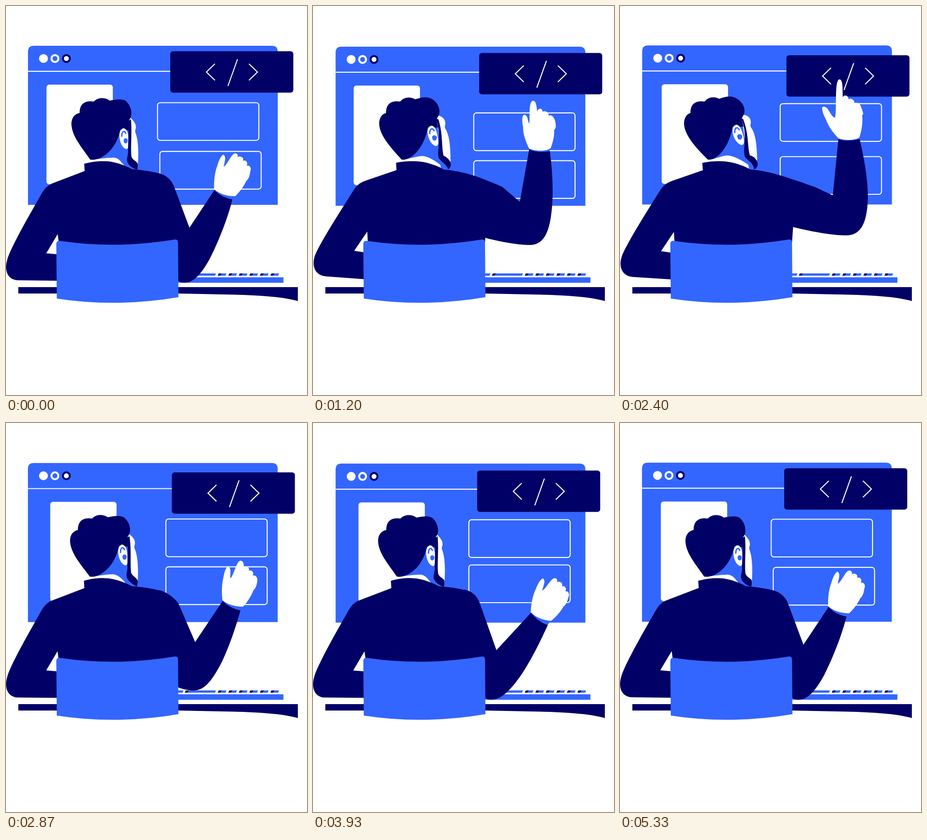
Write an HTML page that moves like this. It is 658 px wide and 851 px high and loops after 5.39 s.

```html
<!DOCTYPE html>
<html lang="en">
<head>
<meta charset="utf-8">
<title>Developer at a screen</title>
<style>
html, body { margin: 0; width: 100%; height: 100%; overflow: hidden; background: #fff; }
svg { display: block; width: 100vw; height: 100vh; }
.navy { fill: #000066; }
.blue { fill: #3366ff; }
.white { fill: #fff; }
.line { fill: none; stroke: #fff; stroke-width: 2.2; }
</style>
</head>
<body>
<svg viewBox="0 0 658 851">
  <g id="win">
    <path class="blue" d="M0,348V13Q0,0 13,0H533Q546,0 546,13V348Z"/>
    <path class="line" d="M0,56H546"/>
    <circle class="white" cx="34" cy="28" r="9.7"/>
    <circle class="white" cx="59" cy="28" r="9.7"/>
    <circle class="blue" cx="59" cy="28" r="5.4"/>
    <circle class="navy" cx="84" cy="28" r="9.7"/>
    <circle class="white" cx="84" cy="28" r="5.4"/>
    <rect id="card" class="white" y="85" width="145" height="218" rx="6"/>
    <rect id="box1" class="line" width="221.5" height="82.5" rx="6"/>
    <rect id="box2" class="line" width="221.5" height="82.5" rx="6"/>
  </g>
  <g id="badge">
    <rect class="navy" width="269" height="90.5" rx="6"/>
    <path class="line" d="M97.5,27.5L79,45.5L97.5,63.5M147,17.5L126,76M172,27.5L190.5,45.5L172,63.5"/>
  </g>
  <g id="keys">
    <rect class="blue" x="370" y="593.5" width="236.5" height="12"/>
    <path class="blue" d="M370,590V585H388L386,590ZM397,590L400,585H459L457,590Z"/>
    <path class="navy" d="M391,590L393,585H400L397,590Z"/>
  </g>
  <path class="navy" d="M27,615H638V645.5C610,637 560,633 500,631.5L377,629H27Z"/>
  <g id="back">
    <path id="neck" class="blue"/>
    <path id="collar" class="white"/>
  </g>
  <path id="torso" class="navy"/>
  <path id="arm" class="navy"/>
  <path id="cuff" class="blue"/>
  <path id="hand" class="white"/>
  <g id="head">
    <path id="face" class="white"/>
    <path id="beard" class="navy"/>
    <path id="hair" class="navy"/>
    <path id="ear" class="white"/>
    <path id="curl" fill="none" stroke="#3366ff" stroke-width="3"/>
    <path id="lobe" class="blue"/>
  </g>
  <path class="blue" d="M110,521Q110,512 119,514Q240,532 368,511Q376,509 376,518L377,637Q240,660 111,640Z"/>
</svg>
<script>
const LOOP = 5390, STEP = 200 / 3;
const $ = id => document.getElementById(id);

// Each part: rest pose first, then the poses it blends toward.
const parts = {
  torso: [
    'M171,345C190,340 203,339 217,339.5C240,340 262,350 276,357C300,359 320,362 338,367L356,400L377,480L377,530L117,530L113,499L88,541L111,543L130,545L130,601L110,601L25,600C5,599 -4,580 2,558C5,540 35,485 77,412C83,401 90,392 104,387L172,361Z',
    'M186,342C205,339 218,339 232,340C255,342 280,350 290,358C306,359 328,364 345,369L378,386L380,475L374,530L122,530L121,491L91,533L111,537L130,540L130,597L110,596L30,588C8,586 -3,570 4,545C8,530 50,465 92,402C100,390 106,385 120,380L187,358Z'
  ],
  arm: [
    'M250,400L335,366C353,371 362,382 367,394L401,485L456,402C464,412 478,420 495,423C484,468 462,520 446,552C428,585 410,605 393,605C386,606 380,604 377,602L300,500Z',
    'M250,400L345,369C360,373 400,386 430,396L470,409L479,282C492,288 512,285 526,281C538,325 548,370 549,405C550,450 543,494 503,494C475,494 430,487 380,475L300,460Z',
    'M250,400L332,364C350,369 359,380 364,394L401,500L482,418C491,431 506,443 518,446C497,488 478,522 458,550C432,585 412,605 390,605C384,606 380,604 377,602L300,500Z'
  ],
  cuff: [
    'M456,402C464,412 478,420 495,423L497,414Z',
    'M479,282C492,288 512,285 526,281L524,276Z',
    'M482,418C491,431 506,443 518,446L524,437Z'
  ],
  hand: [
    'M-1,-1C-2,-22 1,-40 6,-53C9,-64 14,-74 19,-77C27,-72 21,-60 20,-50C28,-56 34,-72 41,-78C47,-82 53,-77 50,-71C55,-75 65,-72 62,-63C68,-67 74,-59 70,-53C78,-54 81,-47 78,-40C77,-32 74,-22 69,-19C64,-7 52,8 45,14C29,15 10,9 -1,-1Z',
    'M0,-1C-9,-14 -19,-32 -19,-46C-24,-58 -25,-73 -20,-75C-10,-73 -11,-60 -6,-58C-5,-70 -13,-113 -2,-115C7,-115 5,-96 8,-86C9,-96 20,-95 19,-87C25,-91 35,-86 34,-79C42,-84 51,-72 52,-54C53,-50 51,-49 50,-48C53,-32 50,-18 48,-7C40,4 13,3 0,-1Z',
    'M0,-1C-10,-12 -22,-26 -27,-42C-33,-52 -38,-68 -34,-70C-20,-72 -20,-50 -7,-46C-3,-65 -9,-128 2,-130C12,-130 8,-100 10,-90C11,-98 23,-95 22,-86C28,-90 36,-84 35,-78C46,-82 50,-72 54,-56C55,-54 53,-53 52,-51C54,-34 50,-15 46,-3C36,4 13,4 0,-1Z'
  ],
  neck: [
    'M190,330L250,268L270,300L268,340L280,357L262,360L200,350Z',
    'M205,330L254,262L282,300L282,330L299,358L275,360L215,350Z'
  ],
  collar: [
    'M183,336C205,335 225,331 238,332C248,334 252,342 256,346C258,348 259,350 259,352L183,345Z',
    'M198,337C220,333 232,326 243,327C262,330 278,342 286,347C288,352 288,357 286,358L199,346Z'
  ],
  face: [
    'M272,244C276,249 284,255 284,265C284,270 281,272 283,277C290,295 290,325 288,350L274,340L268,250Z',
    'M276,238C283,239 292,243 292,254C292,258 290,260 292,265C303,280 305,305 306,338L284,325L272,245Z'
  ],
  beard: [
    'M266,252C270,275 266,305 267,320C266,330 263,335 265,341C269,350 278,356 287,358C288,352 289,346 287,343C282,337 276,337 274,328C272,305 276,275 273,248Z',
    'M271,246C281,270 279,290 278,305C277,315 277,322 279,330C287,340 298,344 299,357C304,356 307,352 307,345C305,334 297,328 290,327C284,305 288,280 275,247Z'
  ],
  hair: [
    'M184,336C165,308 144,285 143,258C143,245 150,236 161,234C161,216 170,206 192,209C200,200 216,199 227,207C243,204 252,203 261,207C273,217 276,232 273,243C271,248 268,250 267,254L268,272L250,270C244,300 228,322 205,333C197,336 190,337 184,336Z',
    'M198,336C178,316 147,285 146,258C146,245 151,237 160,234C160,216 169,206 191,209C198,199 212,197 223,203C240,197 251,196 262,203C275,211 279,223 278,232C277,240 272,243 272,248L276,264L252,264C248,295 230,322 217,330C210,335 204,337 198,336Z'
  ],
  ear: [
    'M248,283C248,272 254,266 259,268C266,271 268,282 267,295C267,305 268,313 263,313C254,311 248,297 248,283Z',
    'M252,273C252,264 257,259 262,260C270,263 273,275 276,286C278,296 278,304 271,304C262,302 253,288 252,273Z'
  ],
  curl: ['M253,286C253,273 260,271 262,280', 'M257,278C256,264 264,264 267,272'],
  lobe: [
    'M257,294C258,288 264,288 266,293C266,301 262,302 258,299Z',
    'M262,285C263,279 270,279 273,284C274,292 268,294 264,291Z'
  ]
};

// [time, value] keys, eased between neighbours; the last key may run past the loop.
const tracks = {
  lean: [[0, 0], [670, -.23], [1450, 1], [1600, 1], [2400, .6], [3050, -.2], [3400, -.23], [4470, .13], [5390, 0]],
  raise: [[0, 0], [700, 0], [1450, 1], [1600, 1], [2400, .93], [3050, 0], [5390, 0]],
  reach: [[0, 0], [670, -.15], [1300, 0], [2400, 0], [3300, 1], [3400, 1], [4470, .6], [5390, 0]],
  point: [[0, 0], [700, 0], [1450, 1], [2400, 1], [3050, 0], [5390, 0]],
  spread: [[0, 0], [1600, 0], [2300, 1], [2450, 1], [3050, 0], [5390, 0]],
  tilt: [[0, 0], [670, -4], [1450, 0], [2400, 0], [3400, 5], [4470, 5], [5390, 0]],
  cardX: [[160, 39.5], [2000, 39.5], [3100, 50], [4700, 50], [5550, 39.5]],
  box1X: [[800, 302], [3450, 301.5], [4400, 281.5], [5250, 282], [6190, 302]],
  box1Y: [[800, 145], [1700, 145], [2700, 122.5], [5250, 123.3], [6190, 145]],
  box2X: [[700, 302], [3450, 301.5], [4400, 281.5], [4950, 281.5], [6090, 302]],
  box2Y: [[700, 249.5], [2050, 249.5], [3200, 221.5], [4950, 222], [6090, 249.5]]
};

function sample(keys, t) {
  if (t < keys[0][0]) t += LOOP;
  const i = Math.max(1, keys.findIndex(k => k[0] > t));
  const [t0, a] = keys[i - 1], [t1, b] = keys[i];
  const u = (t - t0) / (t1 - t0);
  return a + (b - a) * u * u * (3 - 2 * u);
}

const NUM = /-?\d+(\.\d+)?/g;
const values = {};
for (const id in parts) values[id] = parts[id].map(d => d.match(NUM).map(Number));

const mix = (id, i, weights) => {
  const [rest, ...poses] = values[id];
  return poses.reduce((v, pose, n) => v + (weights[n] || 0) * (pose[i] - rest[i]), rest[i]);
};
function morph(id, ...weights) {
  let i = 0;
  $(id).setAttribute('d', parts[id][0].replace(NUM, () => mix(id, i++, weights).toFixed(2)));
}
const move = (id, x, y, more = '') =>
  $(id).setAttribute('transform', `translate(${x.toFixed(2)} ${y.toFixed(2)})${more}`);

function draw(t) {
  const v = {};
  for (const name in tracks) v[name] = sample(tracks[name], t);

  const turn = 2 * Math.PI * t / LOOP, deg = Math.PI / 180;
  const bob = 2 * turn - 30 * deg;
  move('win', 48.8 - .9 * Math.cos(bob), 87.7 + 1.6 * Math.sin(bob));
  move('badge', 361.1 + 3.2 * Math.sin(turn - 38 * deg), 103.5 - 4.5 * Math.cos(turn));
  move('card', v.cardX, 0);
  move('box1', v.box1X, v.box1Y);
  move('box2', v.box2X, v.box2Y);

  morph('torso', v.lean);
  const swing = [v.raise, v.reach];
  morph('arm', ...swing);
  morph('cuff', ...swing);
  morph('hand', v.point - v.spread, v.spread);
  move('hand', mix('cuff', 0, swing), mix('cuff', 1, swing), ` rotate(${v.tilt.toFixed(2)})`);

  for (const id of ['neck', 'collar', 'face', 'beard', 'hair', 'ear', 'curl', 'lobe']) morph(id, v.point);
  const nod = 15 * (v.lean - v.point);
  move('back', nod, 0);
  move('head', nod, 0);
}

let keys = '';
for (let x = 463; x < 580; x += 23) {
  keys += `<path class="navy" d="M${x},590l2,-5h7l-3,5Z"/><path class="blue" d="M${x + 6},590l3,-5h10l-2,5Z"/>`;
}
$('keys').insertAdjacentHTML('beforeend', keys);

let last = -1;
function tick(now) {
  const step = Math.floor((now % LOOP + 4) / STEP);
  if (step !== last) draw(Math.min(step * STEP, LOOP - 1));
  last = step;
  requestAnimationFrame(tick);
}
draw(0);
requestAnimationFrame(tick);
</script>
</body>
</html>
```
